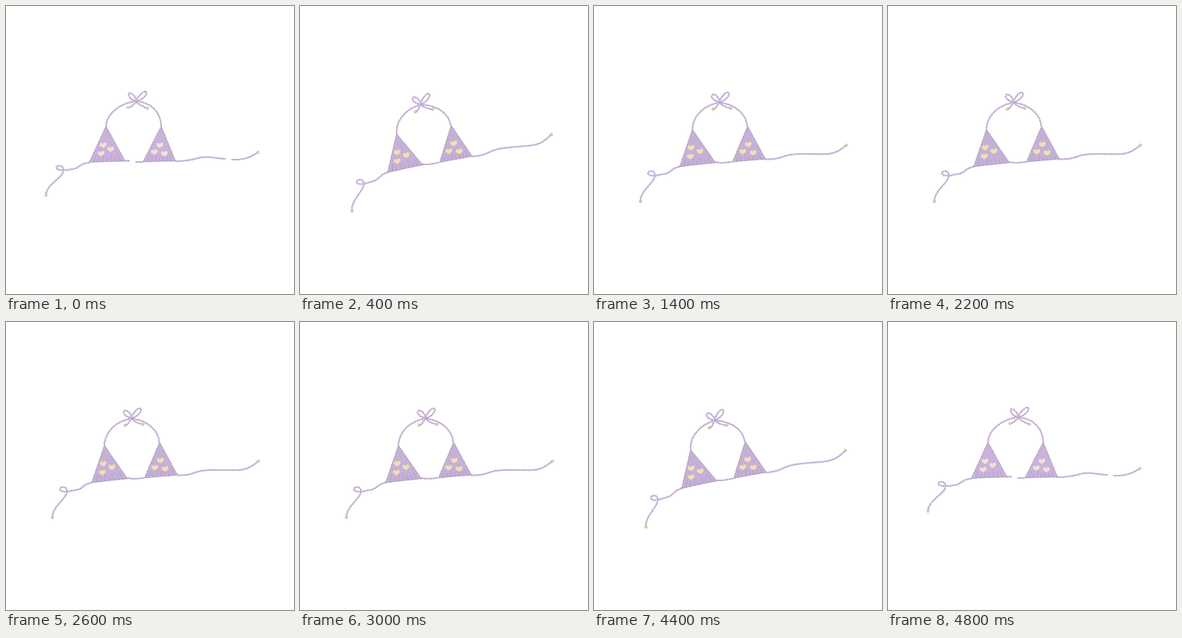
Recreate the animation shown at these times as an HTML page. Size 360 by 360 pixels, loop 5000 ms.

```html
<!DOCTYPE html>
<html lang="en">
<head>
<meta charset="utf-8">
<title>Swaying bikini top</title>
<style>
html, body { margin: 0; width: 100%; height: 100%; overflow: hidden; background: #fff; }
svg { display: block; width: 100vw; height: 100vh; }
path { stroke-linejoin: round; }
.edge { fill: none; stroke: #756b80; stroke-width: 1.9; stroke-dasharray: 1.3 1.7; }
.cord { fill: none; stroke: #c9b3dc; stroke-width: 1.5; }
.rim { fill: none; stroke: #756b80; stroke-width: .9; stroke-dasharray: 1.2 1.6; }
.pleat { fill: none; stroke: #b29fc4; stroke-width: .8; }
</style>
</head>
<body>
<svg viewBox="0 0 360 360"></svg>
<script>
const left = {
  cloth: '#cab2dc', heart: '#efe3cf', bead: '#eed9d2',
  cups: [[125, 150, 104, 195.5, 149, 194], [194, 150, 171, 195, 212, 194]],
  hearts: [[121.5, 174], [131, 179], [119, 184.5], [192.5, 174], [185.5, 182.5], [198, 184.5]],
  beads: [[50, 236.5], [152.5, 127], [177, 128], [315, 183]],
  cords: [
    'M125 151C125 138 138 123 161 119M165 119C184 122 194 135 194 151',
    'M163 119C156 118 152 112 154 109C157 108 162 113 163 119C164 113 172 106 175 107C178 110 170 118 163 119',
    'M163 120C160 122 158 126 152.5 127M163 120C167 124 172 126 177 128',
    'M104 196C93 196 92 203 83 204S73 206 69 205C63 205 61 201 65 200C69 199 73 202 72 206C70 216 51 222 50 236',
    'M149 193.5L155 193.5M162 195L171 195',
    'M212 194C228 194 236 191 245 189C255 188 264 191 275 191M282 192C298 193 307 188 315 183'
  ]
};
const middle = {
  cloth: '#c5b1d7', heart: '#f3dfaf', bead: '#f0cf9d',
  cups: [[123, 154, 107, 201, 152, 196], [192, 150, 173, 195, 214.5, 191.5]],
  hearts: [[121.5, 177], [132.5, 181.5], [120.5, 188], [193, 173], [186, 182], [199, 183.5]],
  beads: [[58, 244.5], [149, 129], [171, 128], [315.5, 174]],
  cords: [
    'M123 155C123 142 132 126 155 121M159 121C178 124 191 136 191.5 151',
    'M157 120C150 119 145 114 148 111C151 109 156 114 157 120C158 114 165 107 168 108C171 111 164 119 157 120',
    'M157 121C154 123 154 128 149 129M157 121C161 125 166 127 171 128',
    'M107 201C97 202 96 209 88 210S80 212 75 212C69 213 65 209 69 207C73 205 77 208 76 213C74 222 58 231 58 244',
    'M152 195C160 197 167 195 173 195',
    'M214 191.5C226 192 232 190 240 187C255 183 275 186 292 185C303 184 309 179 315.5 174'
  ]
};

const shape = (d, attrs) => `<path d="${d}" ${attrs}/>`;

function cup([ax, ay, lx, ly, rx, ry], cloth) {
  const d = `M${ax} ${ay}L${lx} ${ly}Q${(lx + rx) / 2} ${(ly + ry) / 2 - .5} ${rx} ${ry}Z`;
  let pleats = '';
  for (let i = 1; i < 8; i++) {
    const x = lx + (rx - lx) * i / 8, y = ly + (ry - ly) * i / 8;
    const h = i % 2 ? .2 : .13;
    pleats += `M${x} ${y}L${x + (ax - x) * h} ${y + (ay - y) * h}`;
  }
  return shape(d, `fill="${cloth}"`) + shape(pleats, 'class="pleat"') + shape(d, 'class="rim"');
}

const heart = ([x, y], fill) => shape(
  'M0 3.6C-2 2.4-4.6 1-4.2-1.2C-3.8-3.4-1-3.6 0-1.4C1-3.6 3.8-3.4 4.2-1.2C4.6 1 2 2.4 0 3.6Z',
  `fill="${fill}" transform="translate(${x} ${y}) rotate(-6)"`);

const bead = ([x, y], fill) =>
  `<circle cx="${x}" cy="${y}" r="1.6" fill="${fill}" stroke="#a08c8c" stroke-width=".4"/>`;

function draw(p, turn = 0) {
  return `<g transform="rotate(${turn} 180 180)" visibility="hidden">` +
    p.cups.map(c => cup(c, p.cloth)).join('') +
    p.hearts.map(h => heart(h, p.heart)).join('') +
    p.cords.map(d => shape(d, 'class="edge"') + shape(d, 'class="cord"')).join('') +
    p.beads.map(b => bead(b, p.bead)).join('') + '</g>';
}

const svg = document.querySelector('svg');
svg.innerHTML = draw(left) + draw(middle) + draw(middle, -5.7);
const poses = [...svg.children];
const order = [0, 1, 2, 1];

function frame() {
  const step = Math.floor(performance.now() % 5000 / 200);
  poses.forEach((g, i) =>
    g.setAttribute('visibility', i === order[step % 4] ? 'visible' : 'hidden'));
  requestAnimationFrame(frame);
}
frame();
</script>
</body>
</html>
```
